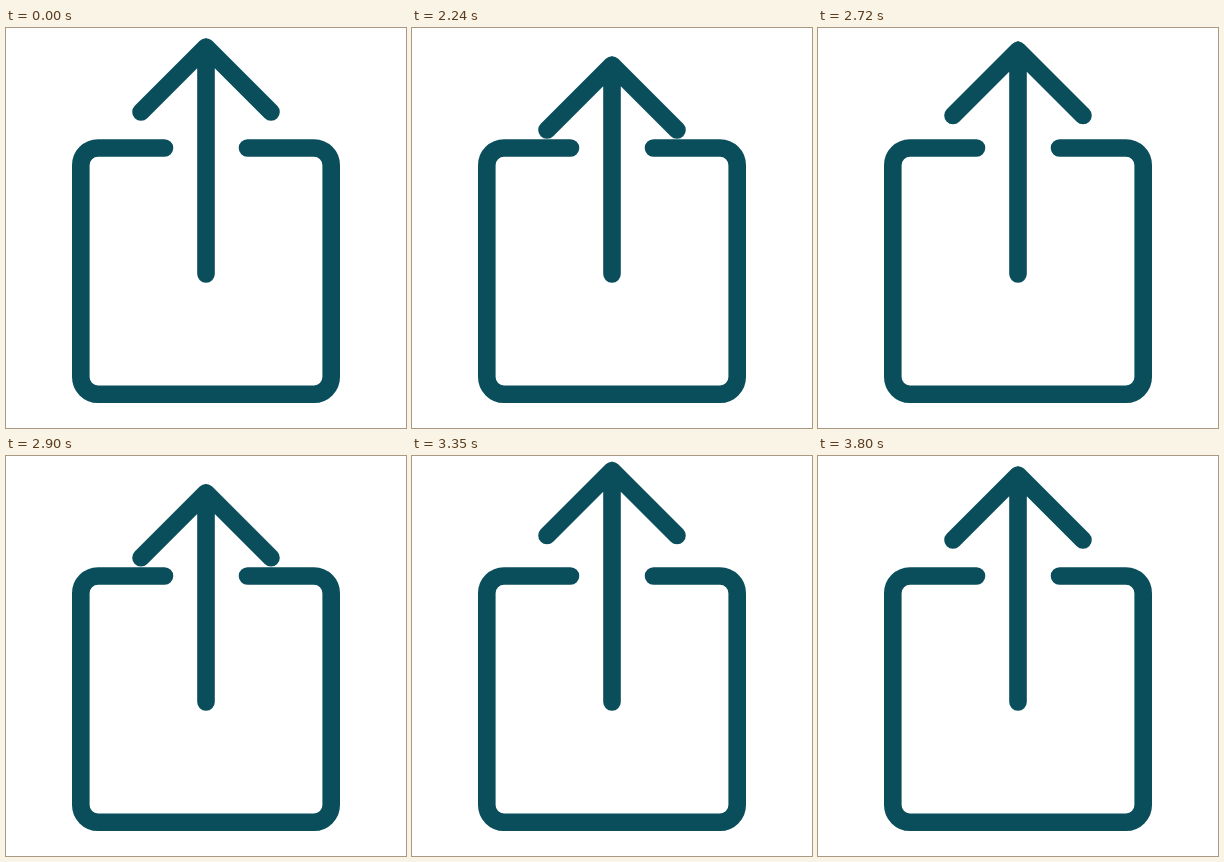
Animation, 400 px wide and 400 px high, one loop 3.83 s. Source, as an HTML page:

```html
<!DOCTYPE html>
<html lang="en">
<head>
<meta charset="utf-8">
<title>Share icon</title>
<style>
  html, body { margin: 0; width: 100%; height: 100%; overflow: hidden; background: #fff; }
  svg { display: block; width: 100%; height: 100%; }
  path { fill: none; stroke: #0a4e5c; stroke-width: 17.6; stroke-linecap: round; stroke-linejoin: round; }
</style>
</head>
<body>
<svg viewBox="0 0 400 400">
  <path d="M158.5 120H92A17.2 17.2 0 0 0 74.8 137.2V349A17.2 17.2 0 0 0 92 366.2H308A17.2 17.2 0 0 0 325.2 349V137.2A17.2 17.2 0 0 0 308 120H241.5"/>
  <path id="arrow"/>
</svg>
<script>
  const LOOP = 3830, PAUSE = 2000, STEP = 30;
  // Turning points of the bob: [step, downward offset in px]
  const turns = [[0, 0], [8.2, 18], [19.2, -8], [30.8, 18], [42.5, -8], [52.5, 8], [60, 0]];
  const arrow = document.getElementById('arrow');

  // Falls from 1 to 0: a cosine swing mixed with a parabola, so the upper turn is sharper.
  const swing = u => 0.75 * (1 + Math.cos(Math.PI * u)) / 2 + 0.25 * (1 - u * u);

  function offset(step) {
    if (step <= 0 || step >= 60) return 0;
    const i = turns.findIndex(([n]) => n > step);
    const [n0, y0] = turns[i - 1], [n1, y1] = turns[i];
    const p = (step - n0) / (n1 - n0);
    return y1 > y0 ? y0 + (y1 - y0) * swing(1 - p) : y1 + (y0 - y1) * swing(p);
  }

  function draw(now) {
    const t = now % LOOP;
    const y = 19 + offset(Math.floor((t - PAUSE) / STEP));
    arrow.setAttribute('d', `M135 ${y + 65}L200 ${y}L265 ${y + 65}M200 ${y}V246`);
  }

  const start = performance.now();
  function tick() {
    draw(performance.now() - start);
    requestAnimationFrame(tick);
  }
  tick();
</script>
</body>
</html>
```
